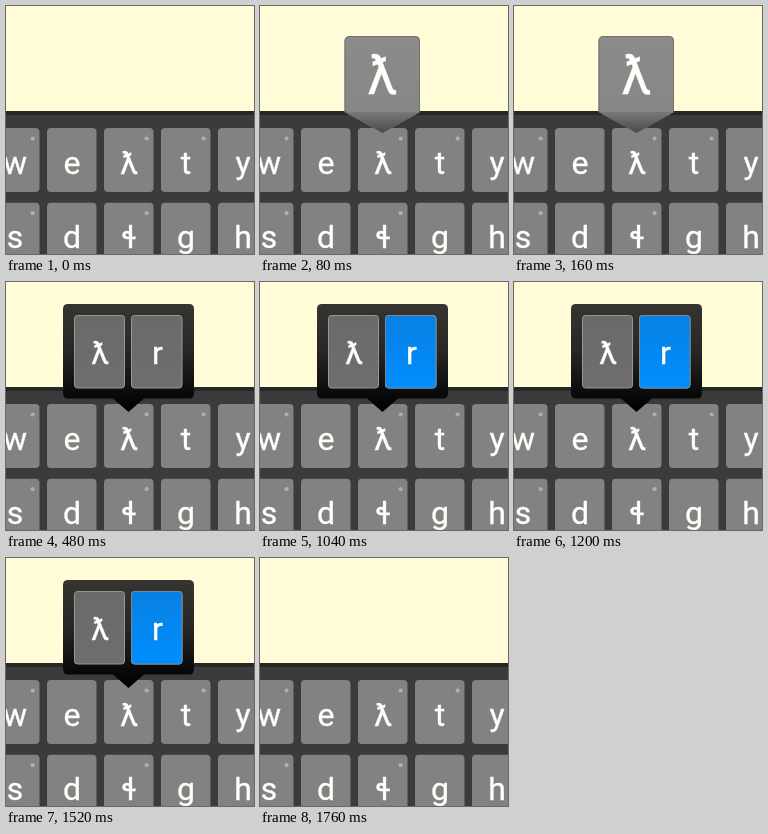
An HTML page that plays this animation: 248x248 px, repeating every 1.84 s.

```html
<!DOCTYPE html>
<html lang="en">
<head>
<meta charset="utf-8">
<title>Long-press keyboard</title>
<style>
  html, body { margin: 0; width: 100%; height: 100%; overflow: hidden; background: #fffcd7; }
  svg { display: block; width: 100vw; height: 100vh; }
  text {
    font: 32px Roboto, "Noto Sans", sans-serif;
    text-anchor: middle;
    fill: #fffffa;
    stroke: #fffffa;
    stroke-width: .35px;
  }
  .big { font-size: 54px; }
  .preview, .menu, .picked { visibility: hidden; animation: 1840ms step-end infinite; }
  .preview { animation-name: preview; }
  .menu { animation-name: menu; }
  .picked { animation-name: picked; }
  /* press 80 ms, menu 480 ms, pick 1040 ms, release 1760 ms */
  @keyframes preview {
    0% { visibility: hidden; }
    4.3478% { visibility: visible; }
    26.087%, 100% { visibility: hidden; }
  }
  @keyframes menu {
    0% { visibility: hidden; }
    26.087% { visibility: visible; }
    95.6522%, 100% { visibility: hidden; }
  }
  @keyframes picked {
    0% { visibility: hidden; }
    56.5217% { visibility: visible; }
    95.6522%, 100% { visibility: hidden; }
  }
</style>
</head>
<body>
<svg viewBox="0 0 248 248">
  <defs>
    <linearGradient id="balloon" x1="0" y1="0" x2="0" y2="1">
      <stop offset="0" stop-color="#8b8b8b"/>
      <stop offset=".75" stop-color="#878787"/>
      <stop offset="1" stop-color="#7c7c7c"/>
    </linearGradient>
    <linearGradient id="tip" x1="0" y1="0" x2="0" y2="1">
      <stop offset="0" stop-color="#787878"/>
      <stop offset="1" stop-color="#4a4a4a"/>
    </linearGradient>
    <linearGradient id="panel" x1="0" y1="0" x2="0" y2="1">
      <stop offset="0" stop-color="#363531"/>
      <stop offset=".45" stop-color="#272624"/>
      <stop offset=".8" stop-color="#0c0c0c"/>
      <stop offset="1" stop-color="#000"/>
    </linearGradient>
    <linearGradient id="option" x1="0" y1="0" x2="0" y2="1">
      <stop offset="0" stop-color="#6a6a6a"/>
      <stop offset="1" stop-color="#6e6e6e"/>
    </linearGradient>
    <linearGradient id="blue" x1="0" y1="0" x2="0" y2="1">
      <stop offset="0" stop-color="#0880e2"/>
      <stop offset="1" stop-color="#008eff"/>
    </linearGradient>
  </defs>

  <rect width="248" height="248" fill="#fffcd7"/>
  <rect y="105" width="248" height="143" fill="#3b3b3b"/>
  <rect y="105" width="248" height="4" fill="#272727"/>
  <g id="keys"></g>

  <g class="preview">
    <path d="M90 30H155Q160 30 160 35V106L122.500 127L84.500 106V35Q84.500 30 90 30Z" fill="url(#balloon)"/>
    <path d="M85 106H160L122.500 127Z" fill="url(#tip)"/>
    <path d="M85 106V35.500Q85 30.500 90 30.500H154.500Q159.500 30.500 159.500 35.500V106" fill="none" stroke="#707070"/>
    <text class="big" x="122.500" y="88">ƛ</text>
  </g>

  <g class="menu">
    <path d="M62 22H183Q188 22 188 27V111Q188 116.500 183 116.500H138L122.500 130L107 116.500H62Q57 116.500 57 111V27Q57 22 62 22Z" fill="url(#panel)"/>
    <g stroke="#979797">
      <rect x="68.500" y="33.500" width="50" height="72.500" rx="3" fill="url(#option)"/>
      <rect x="125.500" y="33.500" width="50.500" height="72.500" rx="3" fill="url(#option)"/>
    </g>
    <rect class="picked" x="125.500" y="33.500" width="50.500" height="72.500" rx="3" fill="url(#blue)" stroke="#6f8ba4"/>
    <text x="94" y="82">ƛ</text>
    <text x="151.500" y="82">r</text>
  </g>
</svg>
<script>
  const keys = document.getElementById('keys');
  const rows = [['w', 'e', 'ƛ', 't', 'y'], ['s', 'd', 'ɬ', 'g', 'h']];
  const dotted = ['w', 'ƛ', 't', 's', 'ɬ'];

  function keyMarkup(label, col, row) {
    const x = -16 + col * 57, y = 122 + row * 74.7;
    const dot = dotted.includes(label)
      ? `<circle cx="${x + 42.6}" cy="${y + 10.5}" r="2.1" fill="#aeaeae"/>` : '';
    return `<rect x="${x}" y="${y}" width="49.5" height="64" rx="4" fill="#828282"/>${dot}
      <text x="${x + 25}" y="${y + 45.5}">${label}</text>`;
  }

  keys.innerHTML = rows.map((row, r) =>
    row.map((label, c) => keyMarkup(label, c, r)).join('')).join('');
</script>
</body>
</html>
```
